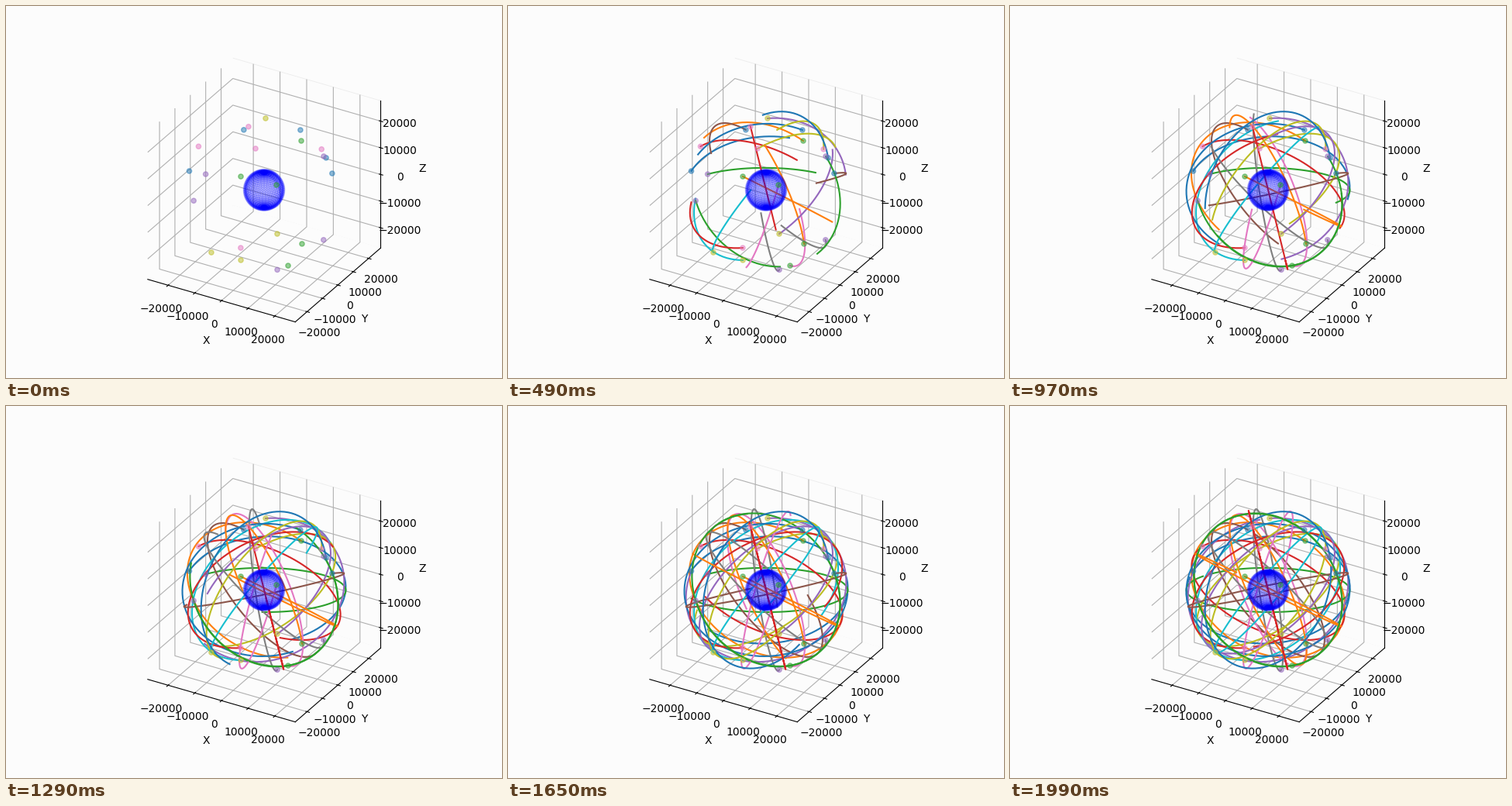
Animation of 640 by 480 pixels, one loop 2.01 s. Source, as a matplotlib script:

```python
import numpy as np
import matplotlib.pyplot as plt
from matplotlib.animation import FuncAnimation

BG = "#fcfcfc"
ORBIT = 26560.0            # orbit radius, km
EARTH = 6371.0
PX = 105.5                 # orbit radius in the view plane units below
STEP = np.radians(3.6)     # angle flown per step
STEPS = 98
HOLD = 5                   # ticks of 10 ms before the first step
TICKS = 201

# View plane position (right, up) at the start and a quarter orbit later.
ORBITS = [
    (-97, 24.4, 42.6, 64.7), (48, 63.4, -86.6, 60), (-76, 20.4, 74.5, 20),
    (-85, 56.4, 50.9, 31.8), (2, 92.4, 103.4, 8.4), (-26, 77.4, -68, 37.8),
    (31, -97.6, 39.5, -12.5), (17, -102.6, -8.8, -17.1),
    (-11, 53.4, 91.4, 49.3), (-30, -90.6, -88.1, 0.1),
    (47, 77.4, -94.7, 36.4), (49, -69.6, -8.1, 67.2),
    (-91, -13.6, 29.9, -98.5), (-30, -74.6, -93.3, -6.5),
    (17, -56.6, 84.2, 59.4), (88, 21.4, 54.4, 6.2),
    (16, 6.4, -27.6, -101.2), (77, -64.6, 10.3, -38.2),
    (74, 52.4, 4.9, 71.4), (-68, -80.6, -11.3, 10.1),
    (80, 41.4, -14.3, 92.2), (-30, 17.4, 89.7, -43.7),
    (77, 43.4, 57, -88.6), (-20, 81.4, 15.2, -61.6),
]


def view_basis(elev=30, azim=-60):
    """Columns: right, up and towards the viewer."""
    e, a = np.radians([elev, azim])
    right = [-np.sin(a), np.cos(a), 0]
    up = [-np.sin(e) * np.cos(a), -np.sin(e) * np.sin(a), np.cos(e)]
    out = [np.cos(e) * np.cos(a), np.cos(e) * np.sin(a), np.sin(e)]
    return np.array([right, up, out]).T


def circle(x0, y0, x1, y1):
    """Track on the circular orbit whose view plane shadow is given."""
    flat = np.array([[x0, x1], [y0, y1]]) / PX
    u, s, vt = np.linalg.svd(flat)
    s = np.array([1.0, min(s[1], 1.0)])
    depth = np.sqrt(1 - s[1] ** 2) * vt[1]
    frame = np.vstack([u @ np.diag(s) @ vt, depth])
    t = STEP * np.arange(STEPS + 1)
    return ORBIT * view_basis() @ frame @ np.array([np.cos(t), np.sin(t)])


def draw_earth(ax):
    lon, lat = np.meshgrid(np.linspace(0, 2 * np.pi, 40),
                           np.linspace(0, np.pi, 30))
    ax.scatter((EARTH * np.cos(lon) * np.sin(lat)).ravel(),
               (EARTH * np.sin(lon) * np.sin(lat)).ravel(),
               (EARTH * np.cos(lat)).ravel(),
               s=5, color="b", alpha=0.1)


def style_axes(ax):
    ax.set_proj_type("ortho")
    ax.set_box_aspect((1, 1, 1))
    ax.view_init(30, -60)
    ax.set_facecolor(BG)
    lim = ORBIT * 25 / 24
    ticks = np.arange(-20000, 20001, 10000)
    ax.set(xlim=(-lim, lim), ylim=(-lim, lim), zlim=(-lim, lim),
           xticks=ticks, yticks=ticks, zticks=ticks,
           xlabel="X", ylabel="Y", zlabel="Z")
    for axis in (ax.xaxis, ax.yaxis, ax.zaxis):
        axis.set_pane_color(BG)
    ax.yaxis.pane.set_edgecolor("#ececec")
    ax.yaxis.pane.set_linewidth(0.6)


fig = plt.figure(figsize=(6.4, 4.8), dpi=100, facecolor=BG)
ax = fig.add_subplot(projection="3d")

tracks = [circle(*o) for o in ORBITS]
draw_earth(ax)
starts = np.array([tr[:, 0] for tr in tracks]).T
ax.scatter(*starts, s=20, alpha=0.5, depthshade=False,
           color=[f"C{2 * k % 10}" for k in range(len(tracks))])
lines = [ax.plot([], [], [], color=f"C{k % 10}")[0]
         for k in range(len(tracks))]
style_axes(ax)


def update(tick):
    step = 0 if tick < HOLD else (tick - HOLD) // 2 + 1
    n = step + 1 if step else 0
    for line, track in zip(lines, tracks):
        line.set_data_3d(*track[:, :n])
    return lines


anim = FuncAnimation(fig, update, frames=TICKS, interval=10,
                     repeat=True, repeat_delay=0, blit=False)
plt.show()
```
